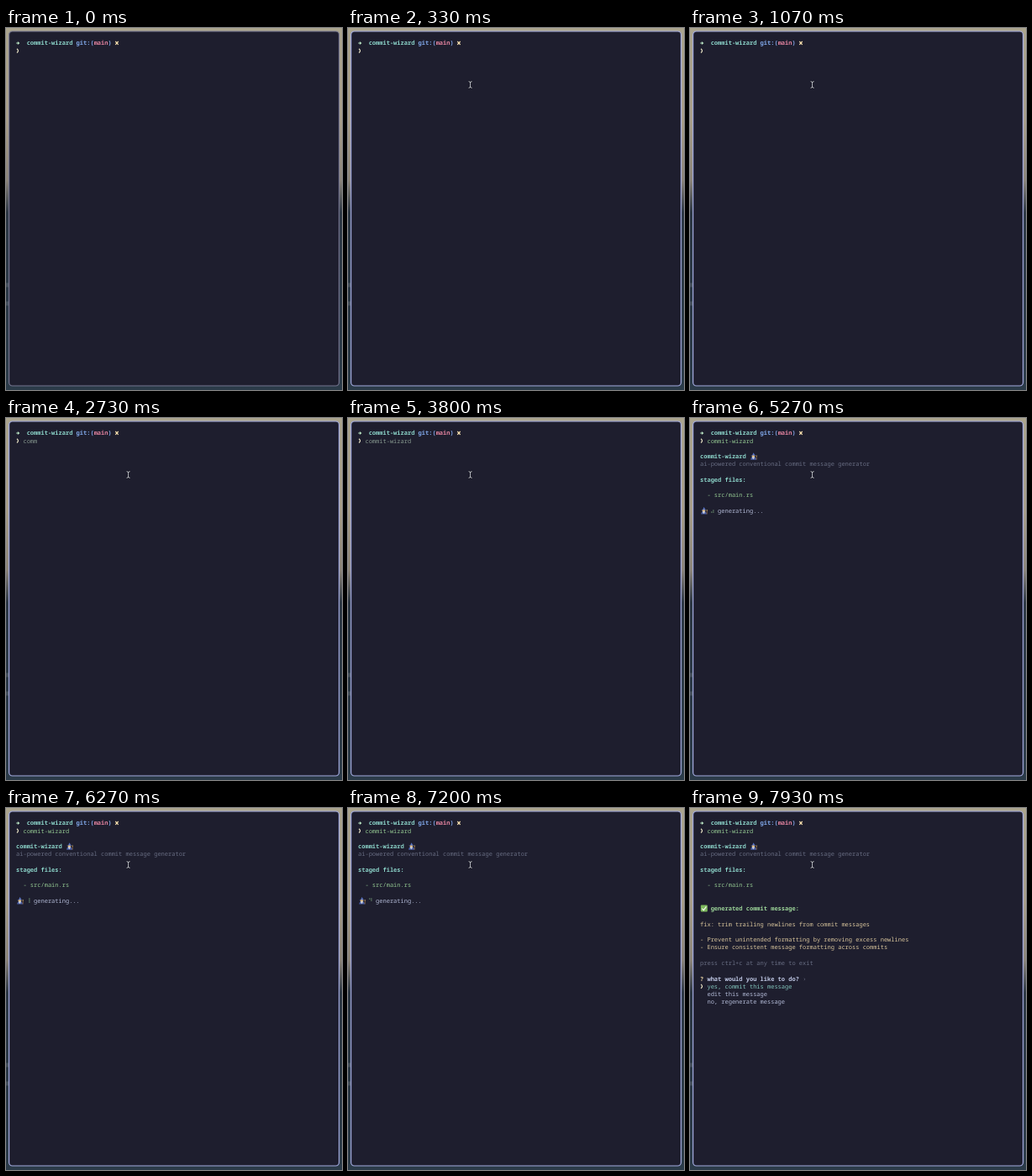
An HTML page that plays this animation: 400 by 431 pixels, repeating every 8 s.

```html
<!DOCTYPE html>
<html lang="en">
<head>
<meta charset="utf-8">
<title>Terminal session</title>
<style>
  html, body { margin: 0; width: 100%; height: 100%; overflow: hidden; background: #26323f; }
  svg { display: block; width: 100%; height: 100%; }
  text {
    font: 7.02px "Noto Sans Mono", "DejaVu Sans Mono", monospace;
    text-rendering: geometricPrecision;
    white-space: pre;
    opacity: .86;
  }
  .bold { font-weight: 700; opacity: .92; }
</style>
</head>
<body>
<svg viewBox="0 0 400 431" xmlns="http://www.w3.org/2000/svg">
  <defs>
    <linearGradient id="wall" x1="0" y1="0" x2="0" y2="1">
      <stop offset="0" stop-color="#aba58f"/>
      <stop offset=".25" stop-color="#aaa08c"/>
      <stop offset=".42" stop-color="#8d867c"/>
      <stop offset=".51" stop-color="#2c3744"/>
      <stop offset="1" stop-color="#2b3b49"/>
    </linearGradient>
    <g id="wizard">
      <path d="M1.2 8.6Q1.4 5.2 4.4 5Q7.6 5.2 8 8.6Z" fill="#4a5fa8"/>
      <circle cx="4.4" cy="4.4" r="1.7" fill="#e3b56b"/>
      <path d="M2.7 4.7Q4.4 5.5 6.1 4.7L5.5 7L4.4 8.2L3.3 7Z" fill="#c9ccd4"/>
      <path d="M.9 3.9L3.3 2.8L4.6 .2L6.2 2.8L8 3.9Q4.4 2.9 .9 3.9Z" fill="#5873c4"/>
      <path d="M8.2 4V8.6" stroke="#a97a4c" stroke-width=".7"/>
      <circle cx="8.2" cy="3.9" r=".6" fill="#e8c96a"/>
    </g>
    <path id="chevron" d="M1 -4.9Q4 -2.5 1 -.1" fill="none" stroke="#ece6c6" stroke-width="1.2"/>
  </defs>
  <rect width="400" height="431" fill="url(#wall)"/>
  <path d="M0 306h3M0 328h3" stroke="#5a6470" stroke-width="5" opacity=".6"/>
  <rect id="window" x="3.6" y="4" width="392.9" height="422" rx="4" fill="#1e1e2e" stroke-width="1.2"/>
  <g id="prompt"></g>
  <g id="command"></g>
  <g id="header"></g>
  <g id="waiting"></g>
  <g id="result"></g>
  <g id="pointer" fill="none">
    <path id="beam" d="M143.6 63.7Q145.6 63.7 145.6 65V70Q145.6 71.3 143.6 71.3M147.6 63.7Q145.6 63.7 145.6 65M145.6 70Q145.6 71.3 147.6 71.3"
      stroke="#11111b" stroke-width="2"/>
    <use href="#beam"/>
    <path d="M143.6 63.7Q145.6 63.7 145.6 65V70Q145.6 71.3 143.6 71.3M147.6 63.7Q145.6 63.7 145.6 65M145.6 70Q145.6 71.3 147.6 71.3"
      stroke="#d4d6de" stroke-width=".9"/>
  </g>
</svg>
<script>
const LOOP = 8000;
const FOCUS = 70, ENTER = 4470, DONE = 7500;
const TICK = 192, TICK_ORIGIN = 4692;
const SPINNER = "⠋⠙⠸⠴⠦⠇";
const COMMAND = "commit-wizard";
const COLOR = {
  teal: "#94e2d5", blue: "#89b4fa", red: "#f38ba8", yellow: "#f9e2af",
  green: "#a6e3a1", gray: "#747a90", light: "#cdd6f4"
};

const byId = id => document.getElementById(id);
const colX = col => 12 + col * 4.212;
const rowY = row => 20.3 + row * 9.26;

function add(parent, tag, attrs, content = "") {
  const node = document.createElementNS("http://www.w3.org/2000/svg", tag);
  for (const key in attrs) node.setAttribute(key, attrs[key]);
  node.textContent = content;
  byId(parent).append(node);
  return node;
}

function write(parent, row, col, content, color, bold = false) {
  return add(parent, "text", {
    x: colX(col), y: rowY(row), fill: COLOR[color], class: bold ? "bold" : ""
  }, content);
}

function stamp(parent, symbol, row, col, dy = 0) {
  add(parent, "use", { href: "#" + symbol, x: colX(col), y: rowY(row) + dy });
}

// Shell prompt
add("prompt", "path", { d: "M12.2 18H15", stroke: "#b9e5c4", "stroke-width": 1 });
add("prompt", "path", { d: "M13.9 16L16.4 18L13.9 20Z", fill: "#b9e5c4" });
write("prompt", 0, 3, COMMAND, "teal", true);
write("prompt", 0, 17, "git:(", "blue", true);
write("prompt", 0, 22, "main", "red", true);
write("prompt", 0, 26, ")", "blue", true);
add("prompt", "path", { d: "M130.3 16L133.7 19.8M133.7 16L130.3 19.8", stroke: COLOR.yellow, "stroke-width": 1.2 });
stamp("prompt", "chevron", 1, 0);

const typed = write("command", 1, 2, "", "green");

// Program output
write("header", 3, 0, COMMAND, "teal", true);
stamp("header", "wizard", 3, 14, -7);
write("header", 4, 0, "ai-powered conventional commit message generator", "gray");
write("header", 6, 0, "staged files:", "teal", true);
write("header", 8, 2, "- src/main.rs", "green");

stamp("waiting", "wizard", 10, 0, -7);
write("waiting", 10, 5, "generating...", "light");
// Braille bits 0-5 run down the left column, then the right one
const dots = Array.from({ length: 6 }, (_, i) => add("waiting", "circle", {
  cx: 25.8 + Math.floor(i / 3) * 2.1, cy: 108 + (i % 3) * 2, r: .62, fill: COLOR.green
}));

add("result", "rect", { x: 12.8, y: 115.6, width: 8, height: 8, rx: 1, fill: "#7cb85c" });
add("result", "path", { d: "M14.4 119.7L16.2 121.7L19.4 117.4", fill: "none", stroke: "#f4f8f0", "stroke-width": 1.2 });
write("result", 11, 3, "generated commit message:", "green", true);
write("result", 13, 0, "fix: trim trailing newlines from commit messages", "yellow");
write("result", 15, 0, "- Prevent unintended formatting by removing excess newlines", "yellow");
write("result", 16, 0, "- Ensure consistent message formatting across commits", "yellow");
write("result", 18, 0, "press ctrl+c at any time to exit", "gray");
write("result", 20, 0, "?", "yellow", true);
write("result", 20, 2, "what would you like to do?", "light", true);
write("result", 20, 29, "›", "gray");
stamp("result", "chevron", 21, 0);
write("result", 21, 2, "yes, commit this message", "teal");
write("result", 22, 2, "edit this message", "light");
write("result", 23, 2, "no, regenerate message", "light");

function typedCount(t) {
  if (t < 2400) return 0;
  if (t < 2670) return Math.min(3, 1 + Math.floor((t - 2400) / 66));
  return Math.min(COMMAND.length, 4 + Math.floor((t - 2670) / 80));
}

function show(id, visible) {
  byId(id).style.display = visible ? "" : "none";
}

function render(t) {
  byId("window").setAttribute("stroke", t < FOCUS ? "#74758f" : "#a3abdf");
  show("pointer", t >= FOCUS);
  typed.textContent = COMMAND.slice(0, typedCount(t));
  typed.setAttribute("fill", t < ENTER ? "#98ad9f" : COLOR.green);
  show("header", t >= ENTER);
  show("waiting", t >= ENTER && t < DONE);
  show("result", t >= DONE);

  const n = SPINNER.length;
  const step = Math.floor((t - TICK_ORIGIN) / TICK);
  const bits = SPINNER.charCodeAt(((step % n) + n) % n) - 0x2800;
  dots.forEach((dot, i) => dot.setAttribute("opacity", bits >> i & 1));
}

const start = performance.now();
function frame() {
  render((performance.now() - start) % LOOP);
  requestAnimationFrame(frame);
}
render(0);
requestAnimationFrame(frame);
</script>
</body>
</html>
```
